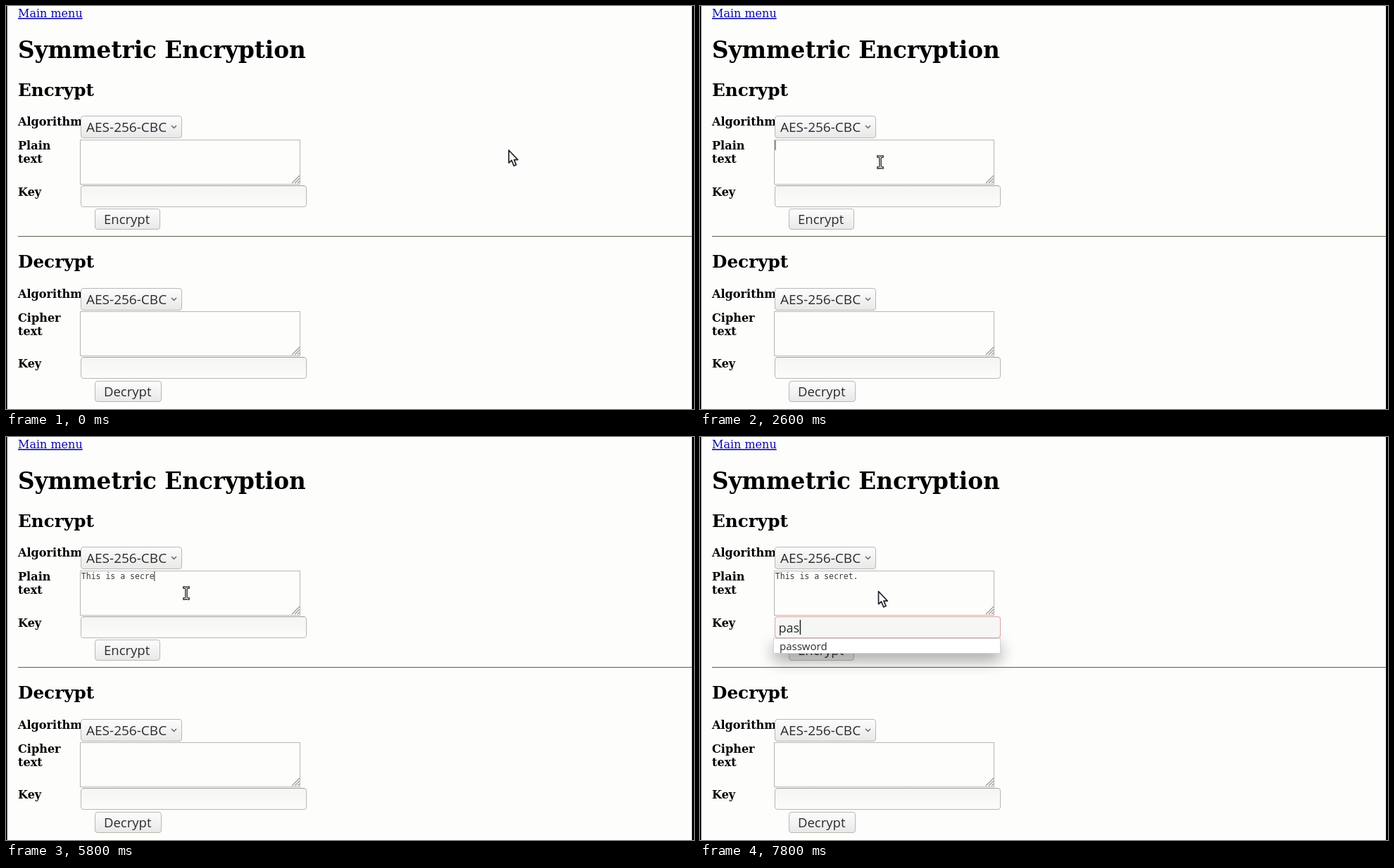
An HTML page that plays this animation: 977x573 px, repeating every 8 s.

```html
<!DOCTYPE html>
<html lang="en">
<head>
<meta charset="utf-8">
<title>Symmetric Encryption</title>
<style>
html, body { margin: 0; width: 100%; height: 100%; overflow: hidden; background: #fdfdfc; }
svg { display: block; width: 977px; height: 573px; }
text { font-family: "DejaVu Serif", serif; white-space: pre; }
.h1 { font-size: 32.65px; font-weight: bold; }
.h2 { font-size: 24.7px; font-weight: bold; }
.label { font-size: 16.1px; font-weight: bold; }
.link { font-size: 16px; fill: #0d0aa8; text-decoration: underline; }
.ui { font: 18.5px "Open Sans", "Noto Sans", sans-serif; fill: #2c2c2c; }
.select { font-size: 19px; }
.key { font-size: 18px; }
.option { font-size: 15px; }
.mono { font: 11.5px "DejaVu Sans Mono", monospace; fill: #3c3c3c; }
.box { stroke: #b8b8b2; }
.line { fill: none; stroke: #666; }
</style>
</head>
<body>
<svg id="stage" viewBox="0 0 977 573"></svg>
<script>
const LOOP = 8000, STEP = 200;
const MESSAGE = "This is a secret.";
const CLICK = 1400, TYPED = 6200, TAB = 7000, SUGGEST = 7600;
// pointer path: time, x, y
const PATH = [
  [0, 714, 205], [200, 694, 206], [400, 620, 210], [600, 510, 216],
  [800, 410, 221], [1000, 356, 223], [1200, 296, 223], [1400, 256, 222]
];

const text = (cls, x, y, s, id = "") => `<text class="${cls}" x="${x}" y="${y}" id="${id}">${s}</text>`;
const box = (x, y, w, h, r, fill, id = "") =>
  `<rect class="box" x="${x + .5}" y="${y + .5}" width="${w - 1}" height="${h - 1}" rx="${r}" fill="${fill}" id="${id}"/>`;

function form(name, field, dy, fieldDy, buttonWidth, id) {
  return text("h2", 17, 128 + fieldDy, name) +
    text("label", 17, 170 + dy, "Algorithm") +
    text("label", 17, 204 + dy, field) +
    text("label", 17, 223 + dy, "text") +
    text("label", 17, 270 + fieldDy, "Key") +
    box(106, 156 + dy, 144, 32, 3.5, "url(#button)") +
    text("ui select", 114, 179 + dy, "AES-256-CBC") +
    `<path class="line" stroke-width="1.5" d="M235 ${170 + dy}l3.5 3.5 3.5-3.5"/>` +
    box(105, 190 + fieldDy, 313, 64, 0, "#fdfdfb") +
    `<path class="line" style="stroke:#999" stroke-width="1.3" d="M406 ${252 + fieldDy}l11-11m-7 11l7-7m-3 7l3-3"/>` +
    box(106, 255 + fieldDy, 321, 31, 3.5, "url(#input)", id) +
    `<path class="line" style="stroke:#9d9d99" d="M109 ${255.5 + fieldDy}H424" id="${id}Edge"/>` +
    box(126, 288 + dy, buttonWidth, 30, 3.5, "url(#button)") +
    text("ui", 139, 309.5 + dy, name);
}

const gradient = (id, from, to) =>
  `<linearGradient id="${id}" x2="0" y2="1"><stop stop-color="${from}"/><stop offset="1" stop-color="${to}"/></linearGradient>`;
const beam = "M-3-8Q0-8 0-6V6Q0 8-3 8M3-8Q0-8 0-6V6Q0 8 3 8";

document.getElementById("stage").innerHTML = `
  <defs>
    ${gradient("button", "#fdfdfd", "#e8e8e8")}
    ${gradient("input", "#f5f5f4", "#fcfcfb")}
    <filter id="blur" x="-20%" y="-300%" width="140%" height="700%"><feGaussianBlur stdDeviation="11"/></filter>
  </defs>
  <rect width="977" height="573" fill="#fdfdfc"/>
  ${text("link", 17, 16, "Main menu")}
  ${text("h1", 17, 74, "Symmetric Encryption")}
  ${form("Encrypt", "Plain", 0, 0, 93, "keyBox")}
  <path d="M17 327.5H974" stroke="#58604c"/>
  ${form("Decrypt", "Cipher", 245, 244, 95, "otherKey")}
  ${text("mono", 106.8, 202, "", "message")}
  <g id="popup">
    <rect x="104" y="296" width="323" height="21" opacity=".38" filter="url(#blur)"/>
    <rect x="106.5" y="255.5" width="320" height="30" rx="3.5" fill="#f6f6f4" stroke="#dca39c"/>
    <rect x="104.5" y="286.5" width="322" height="21" fill="#fff" stroke="#d2d2d2"/>
    ${text("ui option", 113, 303, "password")}
  </g>
  ${text("ui key", 111.5, 277.5, "", "key")}
  <rect id="caret"/>
  <rect width="1.7" height="573"/>
  <rect x="974" width="3" height="573"/>
  <path id="arrow" d="M0 0V18L4 14.5 7.3 22.3 10.6 20.8 7.4 13.6H12.8Z" fill="#fff" stroke="#23232c" stroke-width="1.7" stroke-linejoin="round"/>
  <g id="beam" fill="none" stroke-linecap="square">
    <path d="${beam}" stroke="#1c1c1c" stroke-width="3.6"/>
    <path d="${beam}" stroke="#fff" stroke-width="1.1"/>
  </g>`;

const el = id => document.getElementById(id);
const [message, key, caret, popup, arrow, ibeam] =
  ["message", "key", "caret", "popup", "arrow", "beam"].map(el);
const show = (node, on) => node.setAttribute("visibility", on ? "visible" : "hidden");
const set = (node, attrs) => Object.entries(attrs).forEach(([k, v]) => node.setAttribute(k, v));

function drawPointer(t) {
  let [, x, y] = PATH.filter(p => p[0] <= t).pop();
  const overField = x > 105 && x < 418 && t < SUGGEST;
  if (t >= SUGGEST) [x, y] = [253.5, 219.5];
  show(arrow, !overField);
  show(ibeam, overField);
  set(overField ? ibeam : arrow, { transform: `translate(${x} ${y})` });
}

function drawCaret(t, count) {
  const inKey = t >= TAB;
  const typing = count > 0 && t < TYPED || t >= SUGGEST;
  const since = inKey ? TAB : t >= TYPED ? TYPED : CLICK;
  show(caret, t >= CLICK && (typing || (t - since) % 1200 < 600));
  set(caret, inKey
    ? { x: 112 + key.getComputedTextLength(), y: 260, width: 1.5, height: 21, fill: "#222" }
    : { x: 106.5 + message.getComputedTextLength(), y: 191, width: 1, height: 14, fill: "#333" });
}

function draw(time) {
  const t = Math.floor((time % LOOP) / STEP) * STEP;
  const count = Math.max(0, Math.min(MESSAGE.length, Math.round(4 + (t - 3800) * 11 / 2000)));
  message.textContent = MESSAGE.slice(0, count);
  key.textContent = "pas".slice(0, t < SUGGEST ? 0 : t < SUGGEST + STEP ? 2 : 3);
  el("keyBox").style.stroke = t >= TAB ? "#dfb19c" : "";
  show(el("keyBoxEdge"), t < TAB);
  show(popup, t >= SUGGEST);
  drawPointer(t);
  drawCaret(t, count);
}

let start;
function tick(now) {
  start ??= now;
  draw(now - start);
  requestAnimationFrame(tick);
}
draw(0);
requestAnimationFrame(tick);
</script>
</body>
</html>
```
